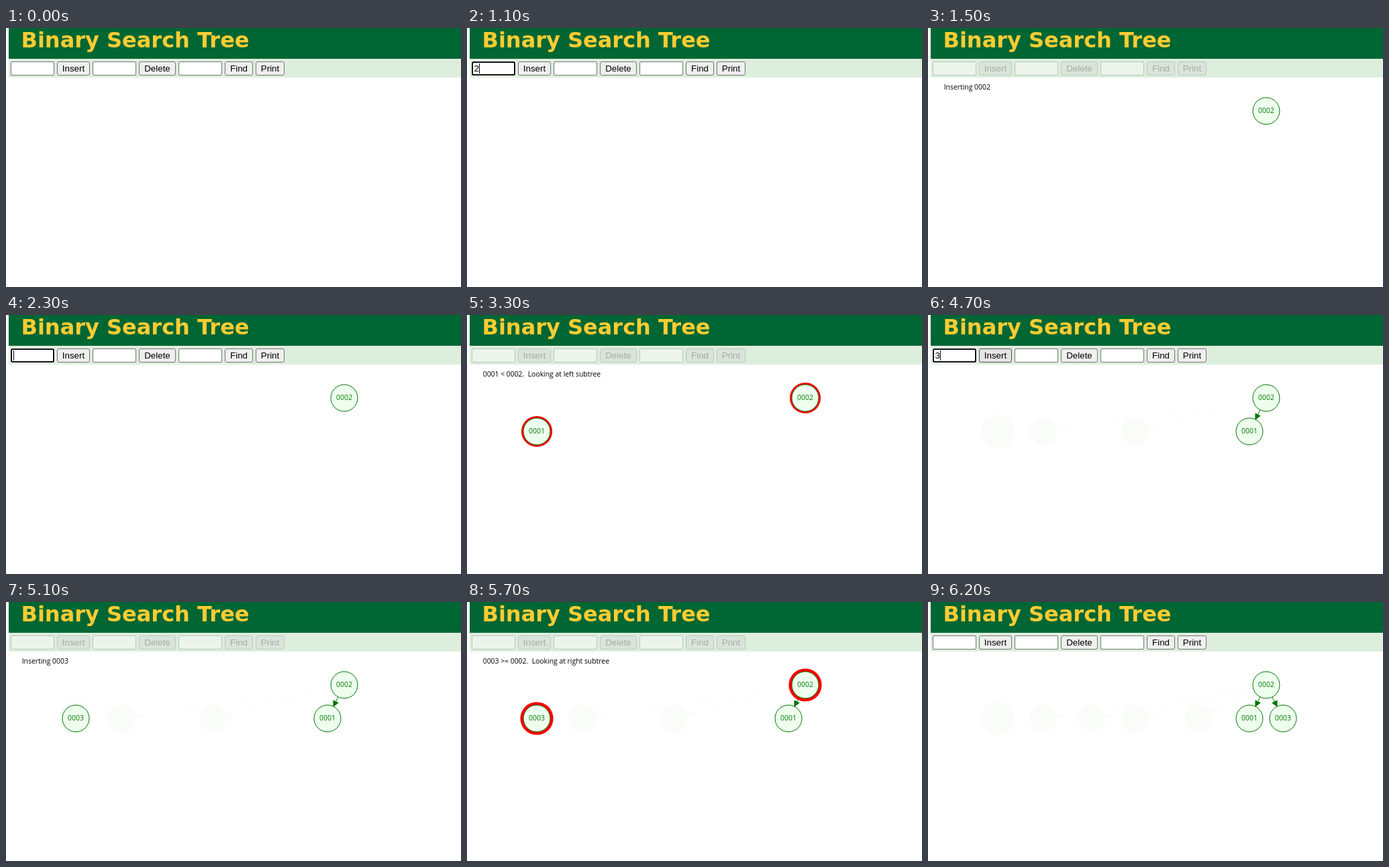
Animation, 678 px wide and 387 px high, one loop 7 s. Source, as an HTML page:

```html
<!DOCTYPE html>
<html lang="en">
<head>
<meta charset="utf-8">
<title>Binary Search Tree</title>
<style>
  html, body { margin: 0; width: 100%; height: 100%; overflow: hidden; background: #fff; }
  svg { display: block; }
  text { white-space: pre; }
  .title { font: bold 32px "DejaVu Sans", sans-serif; fill: #fc3; }
  .control { font: 13.333px "Liberation Sans", Arial, sans-serif; }
  .label { font: 10.4px "Open Sans", "Noto Sans", sans-serif; }
  .mid { text-anchor: middle; }
</style>
</head>
<body>
<svg width="678" height="387" viewBox="0 0 678 387">
  <rect x="4" width="674" height="46" fill="#063"/>
  <rect x="4" y="46" width="674" height="28" fill="#ded"/>
  <text class="title" x="22.5" y="29">Binary Search Tree</text>
  <g id="controls"></g>
  <g id="tree"></g>
</svg>
<script>
const LOOP = 7000, TICK = 100, RADIUS = 20;
const GREEN = '#070', TRAIL = '#fafcfa';

// time, input state, typed text, insert button state
const controlSteps = [
  [0, 'idle'], [600, 'hover'], [800, 'focus'], [1100, 'focus', '2'],
  [1200, 'focus', '2', 'hover'], [1400, 'idle', '2', 'press'], [1500, 'off'],
  [1800, 'idle', '', 'hover'], [2000, 'hover'], [2300, 'focus'],
  [2500, 'focus', '1'], [2700, 'focus', '1', 'hover'],
  [2900, 'idle', '1', 'press'], [3000, 'off'], [4000, 'idle'],
  [4200, 'focus'], [4500, 'focus', '3'], [4700, 'focus', '3', 'hover'],
  [5000, 'idle', '3', 'press'], [5100, 'off'], [6200, 'idle']
];

const statusSteps = [
  [0, ''], [1500, 'Inserting 0002'], [1800, ''],
  [3000, 'Inserting 0001'], [3300, '0001 &lt; 0002.  Looking at left subtree'],
  [3800, 'Found null tree, inserting element'], [4000, ''],
  [5100, 'Inserting 0003'], [5400, '0003 &gt;= 0002.  Looking at right subtree'],
  [5900, 'Found null tree, inserting element'], [6100, '']
];

const root = { x: 504, y: 124, label: '0002', born: 1500 };
const children = [
  { label: '0001', born: 3000, compare: 3300, move: 3800, path: [172, 308, 479], glow: 3.1 },
  { label: '0003', born: 5100, compare: 5400, move: 5900, path: [244, 402, 529], glow: 3.25 }
];
const CHILD_Y = 174, START_X = 104;

const inputStyles = {
  idle: ['#fff', '#767676'], hover: ['#fff', '#4f4f4f'], off: ['#ecf4ec', '#b7c7b7']
};
const buttonStyles = {
  idle: ['#efefef', '#767676', '#000'], hover: ['#e5e5e5', '#4f4f4f', '#000'],
  press: ['#f5f5f5', '#8d8d8d', '#000'], off: ['#dae4da', '#bccabc', '#a5ada5']
};

const current = (steps, t) => steps.filter(s => s[0] <= t).pop();

const rect = (x, y, w, h, r, fill, stroke = 'none') =>
  `<rect x="${x}" y="${y}" width="${w}" height="${h}" rx="${r}" fill="${fill}" stroke="${stroke}"/>`;
const text = (cls, x, y, fill, str) =>
  `<text class="${cls}" x="${x}" y="${y}" fill="${fill}">${str}</text>`;
const circle = (x, y, r, fill, stroke = 'none') =>
  `<circle cx="${x}" cy="${y}" r="${r}" fill="${fill}" stroke="${stroke}"/>`;

function input(x, state, value = '') {
  let out;
  if (state === 'focus') {
    out = rect(x - 1, 49, 67, 23, 3, '#fff') + rect(x, 50, 65, 21, 2.5, '#101010')
        + rect(x + 2, 52, 61, 17, 1, '#fff')
        + rect(value ? x + 11 : x + 4, 53, 1, 15, 0, '#000');
  } else {
    out = rect(x + .5, 50.5, 64, 20, 1.5, ...inputStyles[state]);
  }
  return out + text('control', x + 3.6, 65, '#000', value);
}

function button(x, w, label, state) {
  const [fill, border, ink] = buttonStyles[state];
  return rect(x + .5, 50.5, w - 1, 20, 2.5, fill, border)
       + text('control mid', x + w / 2, 65, ink, label);
}

function drawControls(t) {
  const [, field, value, insert = 'idle'] = current(controlSteps, t);
  const rest = field === 'off' ? 'off' : 'idle';
  return input(7, field, value) + button(76, 49, 'Insert', rest === 'off' ? rest : insert)
       + input(129, rest) + button(198, 55, 'Delete', rest)
       + input(257, rest) + button(326, 42, 'Find', rest)
       + button(372, 43, 'Print', rest);
}

function node(x, y, label, glow) {
  return (glow ? circle(x, y, RADIUS + glow, '#f00') : '')
       + circle(x, y, RADIUS, '#efe', GREEN)
       + text('label mid', x, y + 3, GREEN, label);
}

function edge(x, color) {
  const dx = x - root.x, dy = CHILD_Y - root.y, len = Math.hypot(dx, dy);
  const ux = dx / len, uy = dy / len;
  const tipX = x - ux * RADIUS, tipY = CHILD_Y - uy * RADIUS;
  const baseX = tipX - ux * 8, baseY = tipY - uy * 8;
  return `<path d="M${root.x + ux * RADIUS} ${root.y + uy * RADIUS}L${tipX} ${tipY}" stroke="${color}"/>`
       + `<path d="M${tipX} ${tipY}L${baseX - uy * 4} ${baseY + ux * 4}`
       + `L${baseX + uy * 4} ${baseY - ux * 4}Z" fill="${color}" stroke="${color}"/>`;
}

function drawTree(t) {
  let trail = '', edges = '', nodes = '', glow = 0;
  for (const c of children) {
    if (t < c.born) continue;
    const moved = Math.floor((t - c.move) / TICK);
    const last = Math.min(moved, c.path.length - 1);
    let x = START_X, ring = 0;
    if (moved >= 0) {
      x = c.path[last];
      trail += circle(START_X, CHILD_Y, 25, TRAIL);
      for (const old of c.path.slice(0, last))
        trail += edge(old, TRAIL) + circle(old, CHILD_Y, RADIUS + .5, TRAIL);
      edges += edge(x, GREEN);
    } else if (t >= c.compare) {
      glow = ring = c.glow + (t - c.compare) * .0045;
    }
    nodes += node(x, CHILD_Y, c.label, ring);
  }
  if (t >= root.born) nodes = node(root.x, root.y, root.label, glow) + nodes;
  return trail + text('label', 23.7, 92, '#000', current(statusSteps, t)[1]) + edges + nodes;
}

const controls = document.getElementById('controls');
const tree = document.getElementById('tree');
const start = performance.now();
let shown = -1;

function frame() {
  const elapsed = Math.max(0, performance.now() - start) % LOOP;
  const t = Math.floor(elapsed / TICK) * TICK;
  if (t !== shown) {
    shown = t;
    controls.innerHTML = drawControls(t);
    tree.innerHTML = drawTree(t);
  }
  requestAnimationFrame(frame);
}
frame();
</script>
</body>
</html>
```
